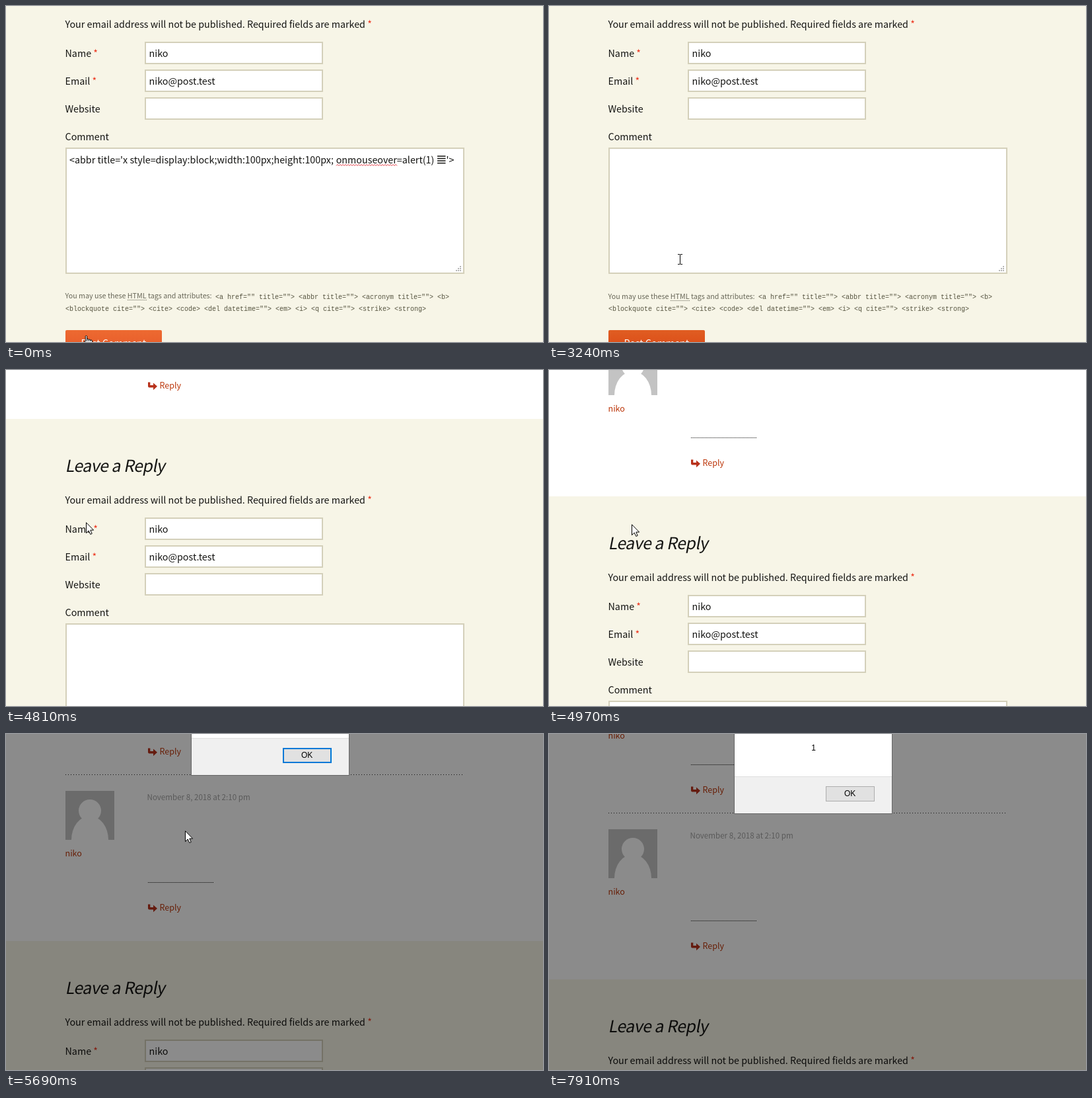
Write an HTML page that moves like this. It is 813 by 508 pixels and loops after 8000 ms.

```html
<!DOCTYPE html>
<html lang="en">
<head>
<meta charset="utf-8">
<title>Comment form</title>
<style>
html, body { margin: 0; width: 100%; height: 100%; overflow: hidden; background: #f7f5e7; }
svg { display: block; width: 100vw; height: 100vh; }
text { white-space: pre; fill: #141412; font: 14.32px "Noto Sans CJK JP", "Noto Sans CJK SC", "Source Sans Pro", "Open Sans", sans-serif; }
.link { fill: #bc360a; font-size: 12.5px; }
.date { fill: #a2a2a2; font-size: 11.6px; }
.title { font-size: 25px; font-weight: 300; letter-spacing: -.54px; }
.star { fill: #ed331c; }
.hint { fill: #686758; font-size: 10.72px; }
.code { fill: #55533f; font: 10px "Liberation Mono", "Courier New", monospace; }
.onbtn { fill: #fff; }
.dlg { fill: #000; font: 12px "Liberation Sans", Arial, sans-serif; text-anchor: middle; }
</style>
</head>
<body>
<svg id="stage" viewBox="0 0 813 508" preserveAspectRatio="none"></svg>
<script>
const LOOP = 8000;
const NAME = 'niko', MAIL = 'niko@post.test';

const esc = s => s.replace(/&/g, '&amp;').replace(/</g, '&lt;').replace(/>/g, '&gt;');
const text = (x, y, s, cls = '', more = '') =>
  `<text x="${x}" y="${y}" class="${cls}" ${more}>${esc(s)}</text>`;
const rect = (x, y, w, h, fill, more = '') =>
  `<rect x="${x}" y="${y}" width="${w}" height="${h}" fill="${fill}" ${more}/>`;
const line = (x1, x2, y, color, dash) =>
  `<path d="M${x1} ${y}H${x2}" stroke="${color}" stroke-dasharray="${dash}" fill="none"/>`;
const box = (x, y, w, h) =>
  rect(x + 1, y + 1, w - 2, h - 2, '#fff', 'stroke="#d4d0ba" stroke-width="2"');
const gradient = (id, a, b) =>
  `<linearGradient id="${id}" x2="0" y2="1"><stop stop-color="${a}"/><stop offset="1" stop-color="${b}"/></linearGradient>`;

// One comment; y is the position of its top divider.
function comment(y) {
  return `<g transform="translate(0 ${y})">` +
    line(90, 692, .5, '#222', '1 3') +
    rect(90, 25, 74, 74, '#c3c3c3') +
    '<path d="M99 99A28 36 0 0 1 155 99Z" fill="#fff"/>' +
    '<ellipse cx="127" cy="55" rx="17" ry="17" fill="#fff"/>' +
    text(89.5, 124, NAME, 'link') +
    text(213.5, 39, 'November 8, 2018 at 2:10 pm', 'date') +
    line(215, 314, 163.5, '#141412', '1 1') +
    '<path d="M215 196.5h3.3v4.5h4.7v-3.5l6 5.3-6 5.4v-3.6h-6q-2 0-2-2z" fill="#b8321c"/>' +
    text(232.5, 206, 'Reply', 'link') + '</g>';
}

function field(y, label, labelEnd, value) {
  return text(89.5, y + 23, label) +
    (labelEnd ? text(labelEnd, y + 23, '*', 'star') : '') +
    box(210, y, 270, 34) + text(216.5, y + 23, value);
}

function grip() {
  let s = '';
  for (let r = 0; r < 3; r++)
    for (let c = 0; c <= r; c++) s += rect(687 - 3 * c, 393 + 3 * r, 2, 2, '#b5b5b5');
  return s;
}

function payload() {
  let wave = 'M500 241.5';
  for (let i = 0; i < 46; i++) wave += `l2 ${i % 2 ? 2 : -2}`;
  const bars = [227, 230.5, 234, 237.5].map(y => rect(653, y - .7, 12.5, 1.5, '#141412')).join('');
  return '<g id="payload">' +
    text(96, 238, "<abbr title='x style=display:block;width:100px;height:100px;") +
    text(499.7, 238, 'onmouseover=alert(1)') + bars + text(666.5, 238, "'>") +
    `<path d="${wave}" fill="none" stroke="#e0202a" stroke-width=".9"/></g>`;
}

function form() {
  return text(0, 0, 'Leave a Reply', 'title', 'transform="translate(89.5 -15) skewX(-11)"') +
    text(89.5, 33, 'Your email address will not be published. Required fields are marked') +
    text(547.3, 33, '*', 'star') +
    field(54, 'Name', 132.3, NAME) + field(96, 'Email', 130.5, MAIL) + field(138, 'Website', 0, '') +
    text(89.5, 203, 'Comment') + box(90, 214, 604, 191) + grip() + payload() +
    '<g id="hint">' + text(89.5, 442, 'You may use these HTML tags and attributes:', 'hint') +
    line(184, 213, 444.5, '#686758', '1 1') + '</g>' +
    text(317, 443, '<a href="" title=""> <abbr title=""> <acronym title=""> <b>', 'code') +
    text(90, 461, '<blockquote cite=""> <cite> <code> <del datetime=""> <em> <i> <q cite=""> <strike> <strong>', 'code') +
    rect(90, 490, 146, 40, 'url(#hot)', 'id="button" rx="2"') +
    text(113.5, 515, 'Post Comment', 'onbtn');
}

function dialog() {
  return '<g id="dialog">' +
    rect(280.5, -150.5, 239, 213, '#fff', 'stroke="#666"') +
    rect(281, 6, 238, 56, '#f0f0f0') + rect(281, 6, 238, 1, '#dfdfdf') +
    rect(420, 22, 72, 21, '#e1e1e1', 'id="okFocus" stroke="#0078d7" stroke-width="2"') +
    rect(419.5, 21.5, 73, 22, '#e1e1e1', 'id="okPlain" stroke="#adadad"') +
    text(455.7, 36, 'OK', 'dlg') + text(400.7, -33, '1', 'dlg') + '</g>';
}

const pointers =
  '<g id="arrow"><path d="M.5.7V16.6L4.2 13 6.8 18.5 9.2 17.4 6.8 12.1H11.6Z" fill="#fff" stroke="#000"/></g>' +
  '<g id="beam"><path d="M0 .5H2.5Q3.5.5 3.5 1.5Q3.5.5 4.5.5H7M3.5 1V15M0 15.5H2.5Q3.5 15.5 3.5 14.5Q3.5 15.5 4.5 15.5H7" fill="none" stroke="#000"/></g>' +
  '<g id="hand"><path d="M4 18V14L.6 10.5Q.4 8.2 2.3 9V1.5Q2.3.5 3.4.5T4.6 1.5V5.6Q6.8 5 7.2 6.3 9.2 5.7 9.8 7 12.6 6.6 12.6 9V18Z" fill="#fff" stroke="#000"/><path d="M4.6 5V9M7.2 6V9M9.8 7V9" stroke="#000"/></g>';

const stage = document.getElementById('stage');
stage.innerHTML =
  '<defs>' + gradient('hot', '#ed6a31', '#e55627') + gradient('cold', '#e05d22', '#d94412') + '</defs>' +
  rect(0, 0, 813, 508, '#f7f5e7') +
  '<g id="page">' + rect(0, -900, 813, 805, '#fff') + comment(-583) + comment(-347) + form() + '</g>' +
  rect(0, 0, 813, 508, '#000', 'id="dim" opacity=".455"') + dialog() + pointers;

const el = {};
stage.querySelectorAll('[id]').forEach(n => el[n.id] = n);

// Every track holds its value until the next time.
const scroll = [[0, 0], [4660, 42], [4810, 169], [4970, 286], [5120, 404], [5270, 408], [7780, 437], [7910, 466]];
const pointer = [
  [0, 'hand', 118, 498], [1250, 'arrow', 124, 482], [1380, 'arrow', 132, 466],
  [1520, 'arrow', 146, 440], [1640, 'beam', 174, 400], [1760, 'beam', 192, 378],
  [2160, 'beam', 198, 375], [2310, 'beam', 192, 373], [2440, 'beam', 195, 375],
  [4050, 'beam', 191, 365], [4170, 'beam', 176, 335], [4290, 'beam', 158, 298],
  [4420, 'beam', 140, 260], [4540, 'beam', 126, 236], [4660, 'arrow', 121, 230],
  [4970, 'arrow', 125, 233], [5120, 'arrow', 129, 236], [5270, 'arrow', 132, 238],
  [5420, 'arrow', 185, 203], [5540, 'arrow', 248, 161], [5690, 'arrow', 271, 146],
  [5940, 'arrow', 275, 144], [6090, 'arrow', 310, 128], [6220, 'arrow', 365, 110],
  [6340, 'arrow', 405, 102], [6490, 'arrow', 404, 115], [6610, 'arrow', 403, 126],
  [6760, 'arrow', 400, 152], [6880, 'arrow', 403, 171], [7030, 'arrow', 406, 174],
  [7150, 'arrow', 436, 142], [7270, 'arrow', 492, 74], [7390, 'arrow', 543, -2],
  [7540, 'arrow', 546, -9], [7780, 'none', 0, 0]
];

const at = (track, t) => track.reduce((hit, step) => step[0] <= t ? step : hit);
const show = (node, on) => node.setAttribute('visibility', on ? 'visible' : 'hidden');
const move = (node, x, y) => node.setAttribute('transform', `translate(${x} ${y})`);

function draw(t) {
  const y = at(scroll, t)[1];
  const [, kind, px, py] = at(pointer, t);
  const sent = t >= 3120, alerting = t >= 5690, panned = t >= 7780;
  move(el.page, 0, y);
  move(el.dialog, 0, y - 408);
  move(el.hint, 0, sent ? 1 : 0);
  show(el.payload, !sent);
  el.button.setAttribute('fill', sent ? 'url(#cold)' : 'url(#hot)');
  show(el.dim, alerting);
  show(el.dialog, alerting);
  show(el.okFocus, alerting && !panned);
  show(el.okPlain, alerting && panned);
  for (const k of ['arrow', 'beam', 'hand']) {
    show(el[k], k === kind);
    move(el[k], px, py);
  }
}

const start = performance.now();
function tick() {
  draw((performance.now() - start) % LOOP);
  requestAnimationFrame(tick);
}
tick();
</script>
</body>
</html>
```
